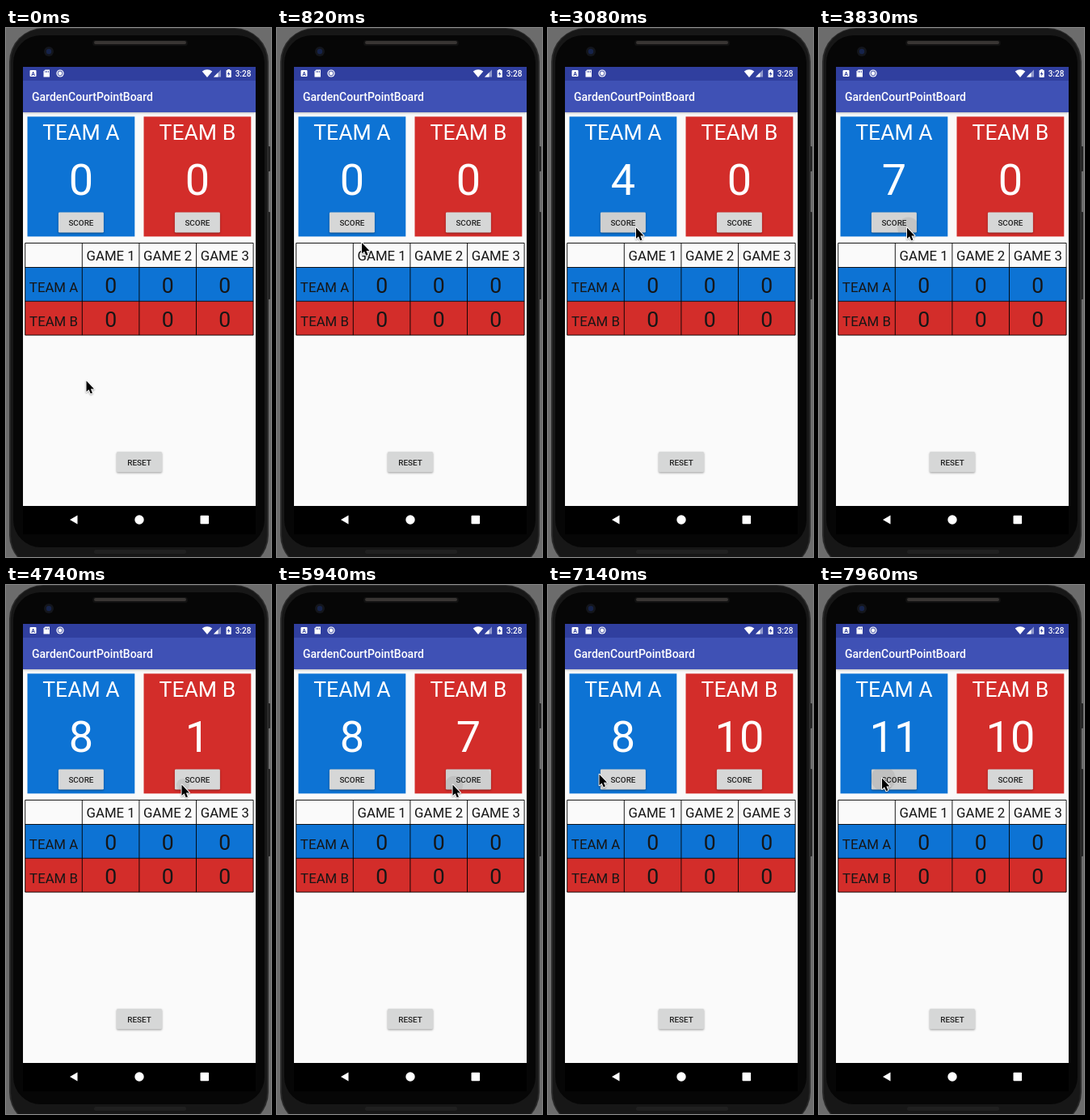
Write an HTML page with a canvas that moves like this. It is 328 px wide and 653 px high and loops after 8000 ms.

```html
<!DOCTYPE html>
<html lang="en">
<head>
<meta charset="utf-8">
<title>Score board</title>
<style>
  html, body { margin: 0; width: 100%; height: 100%; overflow: hidden; background: #6c6c6c; }
  canvas { display: block; width: 328px; height: 653px; }
</style>
</head>
<body>
<canvas id="stage" width="328" height="653"></canvas>
<script>
const ctx = document.getElementById('stage').getContext('2d');
const LOOP = 8000, RIPPLE = 340;
const BLUE = '#0d73d4', RED = '#d32d2a', INK = '#161616', WHITE = '#fff', INDIGO = '#303f9f';

// Taps come in evenly spaced bursts
const burst = (start, count, gap = 0) => Array.from({ length: count }, (_, i) => start + i * gap);
const tapsA = [...burst(1300, 1), ...burst(2110, 3, 370), ...burst(3300, 4, 250), ...burst(7550, 3, 185)];
const tapsB = burst(4740, 10, 197);

// Pointer strokes; bow bends a stroke to the left of its heading
const home = { x: 99, y: 435 };
const strokes = [
  { from: 270, to: 880, x: 108.5, y: 246, bow: 10 },
  { from: 4080, to: 4460, x: 217, y: 246, bow: 0 },
  { from: 6540, to: 6850, x: 57, y: 238, bow: 0 },
  { from: 7090, to: 7260, x: 77.5, y: 238, bow: 6 }
];

function pointerAt(t) {
  let { x, y } = home;
  for (const s of strokes) {
    const k = Math.min(1, Math.max(0, (t - s.from) / (s.to - s.from)));
    const dx = s.x - x, dy = s.y - y;
    const bend = s.bow * Math.sin(Math.PI * k) / Math.hypot(dx, dy);
    x += dx * k + dy * bend;
    y += dy * k - dx * bend;
    if (k < 1) break;
  }
  return { x, y };
}

function rect(x, y, w, h, color) {
  ctx.fillStyle = color;
  ctx.fillRect(x, y, w, h);
}

function round(x, y, w, h, r, color) {
  ctx.beginPath();
  ctx.roundRect(x, y, w, h, r);
  ctx.fillStyle = color;
  ctx.fill();
}

function disc(x, y, r, color) {
  ctx.beginPath();
  ctx.arc(x, y, r, 0, Math.PI * 2);
  ctx.fillStyle = color;
  ctx.fill();
}

function shape(path, color) {
  ctx.fillStyle = color;
  ctx.fill(new Path2D(path));
}

function text(str, x, y, size, color, weight = 400, align = 'center') {
  ctx.font = `${weight} ${size}px Roboto, sans-serif`;
  ctx.textAlign = align;
  ctx.fillStyle = color;
  ctx.fillText(str, x, y);
}

function shadow(color, blur, dy) {
  ctx.shadowColor = color;
  ctx.shadowBlur = blur;
  ctx.shadowOffsetY = dy;
}

function phone() {
  rect(0, 0, 328, 653, '#6c6c6c');
  round(322, 146, 5, 31, 1, '#222');
  round(322, 227, 5, 108, 1, '#222');
  round(4, 0, 321, 668, 42, '#2a2a2a');
  round(6, 1, 317, 666, 40, '#171717');
  round(9, 9, 311, 632, 34, '#060606');
  round(107, 15, 118, 7, 3.5, '#111');
  round(109, 16, 114, 4, 2, '#383533');
  round(109, 644, 114, 5, 2.5, '#202020');
  disc(53, 29, 6, '#14161c');
  disc(53, 29, 3.2, '#16234a');
  rect(21, 48, 288, 577, '#000');
  rect(21, 48, 288, 542, '#fafafa');
}

function statusBar() {
  rect(21, 48, 288, 17, INDIGO);
  round(29.5, 52, 8, 8, 1, WHITE);
  text('A', 33.5, 58.7, 7, INDIGO, 700);
  shape('M48.5 51.5H54V60.5H46.5V53.5Z', WHITE);
  for (let i = 0; i < 3; i++) rect(48.4 + i * 1.8, 53, 0.8, 2, INDIGO);
  disc(67, 56, 4.6, WHITE);
  disc(67, 56, 3.4, '#6874ba');
  disc(67, 56, 2.2, WHITE);
  shape('M249 61L242.7 53.5Q249 49 255.3 53.5Z', WHITE);
  shape('M266 51.5V60.5H257Z', '#8f98cc');
  shape('M262.5 55V60.5H257Z', WHITE);
  rect(274.2, 51, 3, 1.5, WHITE);
  round(272.6, 52, 6.2, 9, 0.7, WHITE);
  shape('M276.2 53.4L273.8 57H275.4L275.2 59.6L277.5 56H276Z', INDIGO);
  text('3:28', 293.5, 60, 10, WHITE, 500);
}

function appBar() {
  ctx.save();
  ctx.beginPath();
  ctx.rect(21, 65, 288, 60);
  ctx.clip();
  shadow('rgba(0,0,0,.35)', 3, 1.2);
  rect(21, 65, 288, 39, '#3f51b5');
  ctx.restore();
  text('GardenCourtPointBoard', 32, 90, 14, WHITE, 500, 'left');
}

function button(label, cx, y, taps, t) {
  const box = [cx - 28, y, 56, 25, 1.4];
  ctx.save();
  shadow('rgba(0,0,0,.38)', 2.5, 1);
  round(...box, '#d6d7d7');
  ctx.restore();

  ctx.save();
  ctx.beginPath();
  ctx.roundRect(...box);
  ctx.clip();
  for (const tap of taps) {
    const age = t - tap;
    if (age < 0 || age > RIPPLE) continue;
    const { x, y } = pointerAt(tap);
    const alpha = 0.07 * Math.min(1, 1.5 * (1 - age / RIPPLE));
    disc(x + 2, y + 1, 8 + age * 0.18, `rgba(0,0,0,${alpha})`);
  }
  ctx.restore();
  text(label, cx, y + 16.2, 9.9, '#212121', 500);
}

function panel(x, color, name, taps, t) {
  const w = 132.8, cx = x + w / 2;
  const score = taps.filter(tap => tap <= t).length;
  rect(x, 109.4, w, 148, color);
  text(name, cx, 138, 26.6, WHITE);
  text(score, cx, 206, 54, WHITE);
  button('SCORE', cx, 227.6, taps, t);
}

function table() {
  const left = 23.7, top = 265.5, colW = 70.6, headH = 30, rowH = 41.8;
  const right = left + 4 * colW, bottom = top + headH + 2 * rowH;

  ['TEAM A', 'TEAM B'].forEach((name, row) => {
    const y = top + headH + row * rowH;
    rect(left, y, right - left, rowH, row ? RED : BLUE);
    text(name, left + colW / 2, y + 30.6, 16.8, INK);
    for (let game = 1; game <= 3; game++) text('0', left + (game + 0.5) * colW, y + 31.5, 26.6, INK);
  });
  for (let game = 1; game <= 3; game++) text('GAME ' + game, left + (game + 0.5) * colW, top + 21.5, 16.8, INK);

  ctx.beginPath();
  for (let i = 0; i <= 4; i++) {
    ctx.moveTo(left + i * colW, top);
    ctx.lineTo(left + i * colW, bottom);
  }
  for (const y of [top, top + headH, top + headH + rowH, bottom]) {
    ctx.moveTo(left, y);
    ctx.lineTo(right, y);
  }
  ctx.strokeStyle = '#000';
  ctx.lineWidth = 0.9;
  ctx.stroke();
}

function navBar() {
  shape('M79 607L88.5 601.5V612.5Z', WHITE);
  disc(165, 607, 5.7, WHITE);
  round(240.5, 601.7, 10.6, 10.6, 1, WHITE);
}

function pointer({ x, y }) {
  const arrow = new Path2D('M0 0V14.5L3.3 11.5L5.6 17L8 16L5.8 10.7H10.2Z');
  ctx.save();
  ctx.translate(x + 0.5, y + 0.5);
  ctx.scale(0.93, 0.93);
  ctx.lineJoin = 'round';
  ctx.lineWidth = 2;
  ctx.strokeStyle = WHITE;
  ctx.fillStyle = '#000';
  shadow('rgba(0,0,0,.35)', 2, 1);
  ctx.stroke(arrow);
  shadow('transparent', 0, 0);
  ctx.fill(arrow);
  ctx.restore();
}

function draw(now) {
  const t = now % LOOP;
  phone();
  statusBar();
  appBar();
  panel(26.5, BLUE, 'TEAM A', tapsA, t);
  panel(170.5, RED, 'TEAM B', tapsB, t);
  table();
  button('RESET', 165, 523.3, [], t);
  navBar();
  pointer(pointerAt(t));
}

let start;
function tick(now) {
  start ??= now;
  draw(now - start);
  requestAnimationFrame(tick);
}
draw(0);
requestAnimationFrame(tick);
</script>
</body>
</html>
```
